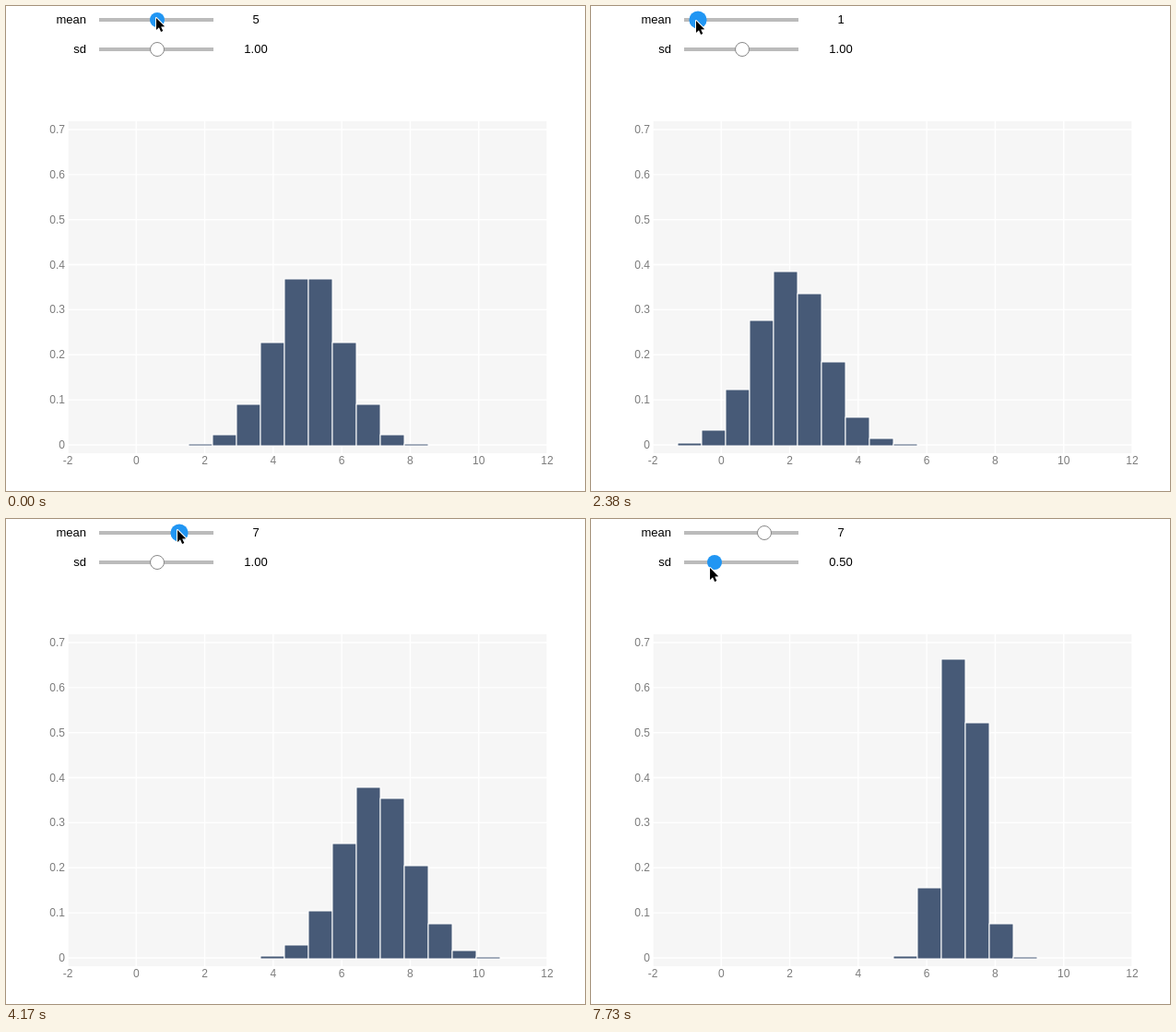
These frames come from a looping animation (628 px wide and 526 px high, 8 s). An HTML page with a canvas:

```html
<!DOCTYPE html>
<html>
<head>
<meta charset="utf-8">
<title>Normal distribution</title>
<style>
  html, body { margin: 0; width: 100%; height: 100%; overflow: hidden; background: #fff; }
  canvas { display: block; }
</style>
</head>
<body>
<canvas id="stage" width="628" height="526"></canvas>
<script>
const ctx = document.getElementById('stage').getContext('2d');
const LOOP = 8000, START = 1050, STEP = 148.4;
const FONT = '"Liberation Sans", Arial, Helvetica, sans-serif';
const BIN = 0.7, BINS = 20, DRAWS = 500;
const PLOT = { x: 67, y: 125, w: 520, h: 360, base: 476 };
const PER_X = PLOT.w / 14, PER_Y = 488.6;
const GRAB = 3; // the pointer holds a thumb slightly left of its centre

// Drags as [step, value]; sliders snap the value to their own grid
const meanKeys = [[-1, 5.08], [0, 4.3], [2, 2], [3, 2], [4, 2.75], [7, 2.75], [9, 1], [12, 1], [14, 2.9], [20, 7]];
const sdKeys = [[27, 1], [29, 1.24], [33, 1.6], [38, 1.051], [44, 0.451]];
const heightKeys = [[-1, 12], [5, 15], [14, 15], [21, 11], [26, 49], [38, 49], [44, 52]];

const mix = (a, b, u) => a + (b - a) * u;
const clamp = u => Math.max(0, Math.min(1, u));

function track(keys, at) {
  let value = keys[0][1];
  for (let i = 1; i < keys.length; i++) {
    const [from] = keys[i - 1], [to, next] = keys[i];
    if (at > from) value = mix(keys[i - 1][1], next, clamp((at - from) / (to - from)));
  }
  return value;
}

const meanAt = n => Math.round(track(meanKeys, n));
const sdAt = n => Math.round(track(sdKeys, n) * 10) / 10;
const meanX = v => 104 + 12 * v;
const sdX = v => 104 + 60 * v;

// Close approximation of the cumulative normal distribution
const cdf = z => 1 / (1 + Math.exp(-1.5976 * z - 0.07056 * z ** 3));

function text(str, x, y, align, size, color) {
  ctx.font = size + 'px ' + FONT;
  ctx.textAlign = align;
  ctx.fillStyle = color;
  ctx.fillText(str, x, y);
}

function line(x1, y1, x2, y2) {
  ctx.beginPath();
  ctx.moveTo(x1, y1);
  ctx.lineTo(x2, y2);
  ctx.stroke();
}

function slider(label, value, x, y, active, pressed) {
  text(label, 87, y + 4, 'right', 13, '#000');
  text(value, 271, y + 4, 'center', 13, '#000');
  ctx.fillStyle = '#bbb';
  ctx.fillRect(101, y - 2, 124, 4);
  ctx.beginPath();
  ctx.arc(x, y, active ? (pressed ? 9.6 : 8) : 7.5, 0, 7);
  ctx.fillStyle = active ? '#2196f3' : '#fff';
  ctx.fill();
  if (!active) {
    ctx.strokeStyle = '#888';
    ctx.lineWidth = 1;
    ctx.stroke();
  }
}

function axes() {
  const { x: left, y: top, w, h, base } = PLOT;
  ctx.fillStyle = '#f6f6f6';
  ctx.fillRect(left, top, w, h);
  ctx.strokeStyle = '#fff';
  ctx.lineWidth = 1.4;
  for (let v = -2; v <= 12; v += 2) {
    const x = left + (v + 2) * PER_X;
    line(x, top, x, top + h);
    text(v, x, 497, 'center', 12, '#7c7c7c');
  }
  for (let i = 0; i <= 7; i++) {
    const y = base - i * PER_Y / 10;
    line(left, y, left + w, y);
    text(i ? '0.' + i : '0', 64, y + 4, 'right', 12, '#7c7c7c');
  }
}

function bars(mean, sd) {
  ctx.lineWidth = 1;
  ctx.strokeStyle = '#fff';
  ctx.fillStyle = '#475a77';
  for (let k = 0; k < BINS; k++) {
    const low = (k * BIN - 2 - mean) / sd;
    const count = Math.round(DRAWS * (cdf(low + BIN / sd) - cdf(low)));
    if (!count) continue;
    const x = PLOT.x + 1 + k * BIN * PER_X;
    const top = Math.round(PLOT.base + 0.3 - count / DRAWS / BIN * PER_Y);
    const height = PLOT.base + 1 - top;
    ctx.fillRect(x, top, BIN * PER_X, height);
    ctx.strokeRect(x, top, BIN * PER_X, height);
  }
}

function pointer(x, y) {
  const shape = [[0, 0], [0, 13], [3, 10.2], [5.1, 15], [7.3, 14.1], [5.2, 9.4], [9.2, 9.2]];
  ctx.beginPath();
  shape.forEach(([dx, dy]) => ctx.lineTo(x + 1 + dx, y + 1 + dy));
  ctx.closePath();
  ctx.lineJoin = 'round';
  ctx.strokeStyle = '#fff';
  ctx.lineWidth = 2;
  ctx.stroke();
  ctx.fillStyle = '#000';
  ctx.fill();
  ctx.lineJoin = 'miter';
}

function draw(now) {
  const t = now % LOOP;
  const n = t < START ? -1 : Math.min(45, Math.floor((t - START + 6) / STEP));
  const mean = meanAt(n), sd = sdAt(n);

  ctx.fillStyle = '#fff';
  ctx.fillRect(0, 0, 628, 526);
  axes();
  bars(meanAt(n - 1), sd); // the chart trails the mean slider by one step
  slider('mean', mean, meanX(mean), 15, n < 23, n >= 0 && n < 22);
  slider('sd', sd.toFixed(2), sdX(sd), 47, n >= 24, n >= 26 && n < 45);

  const hand = mix(meanX(track(meanKeys, n)), sdX(track(sdKeys, n)), clamp((n - 21) / 5));
  pointer(hand - GRAB, track(heightKeys, n));
}

function tick(now) {
  draw(now);
  requestAnimationFrame(tick);
}
draw(0);
requestAnimationFrame(tick);
</script>
</body>
</html>
```
